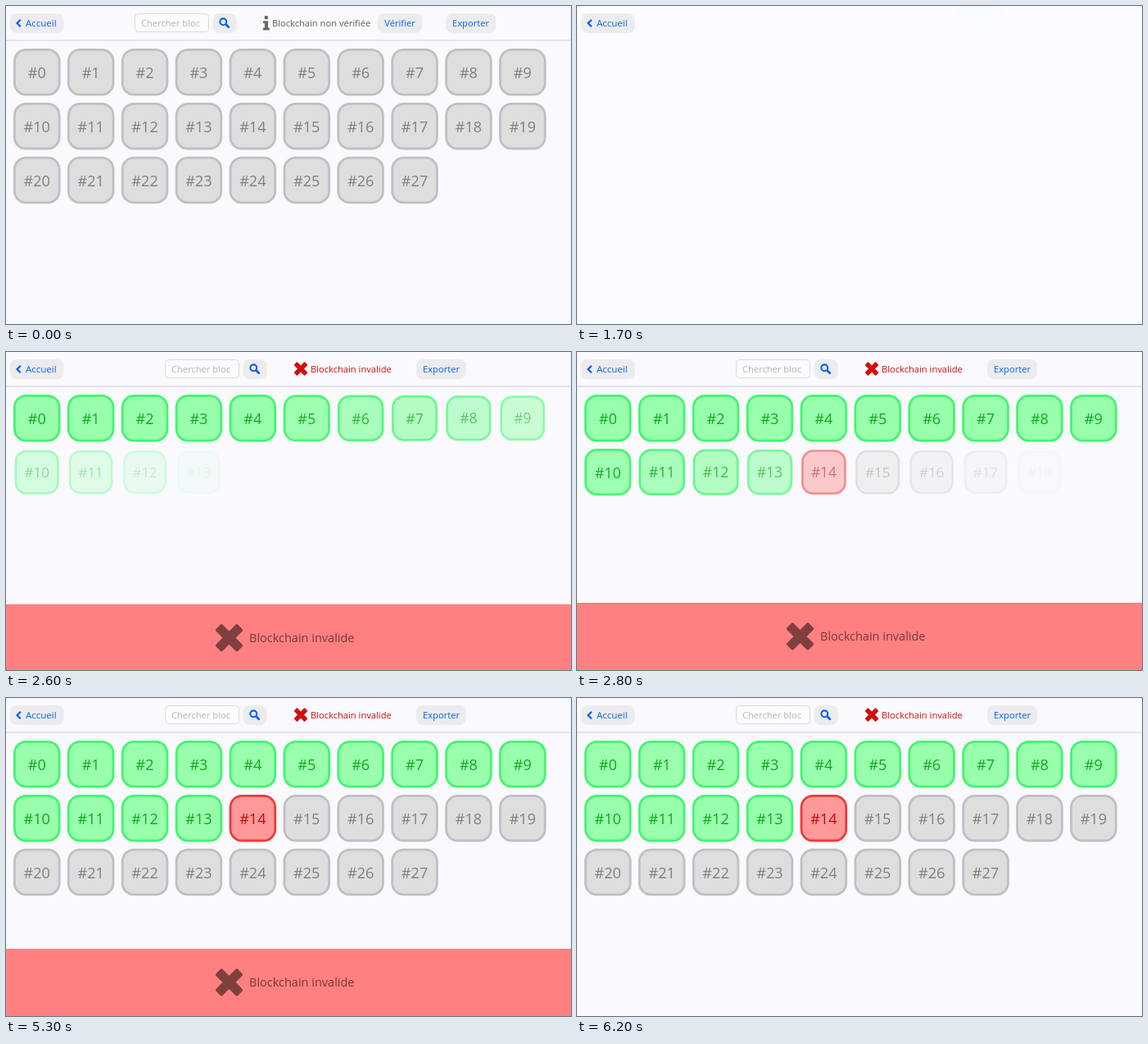
An HTML page with a canvas for the animation above (6900 ms loop, 690x388 px).

```html
<!DOCTYPE html>
<html lang="fr">
<head>
<meta charset="utf-8">
<title>Blockchain</title>
<style>
html, body { margin: 0; width: 100%; height: 100%; overflow: hidden; background: #fafcff; }
canvas { display: block; width: 690px; height: 388px; }
</style>
</head>
<body>
<canvas id="stage"></canvas>
<script>
const W = 690, H = 388, LOOP = 6900, STEP = 100;
const FONT = '"Open Sans", "Noto Sans", sans-serif';
const BLUE = '#0a62f0', BUTTON = '#ececee', PAGE = '#f9f9fe';
const COUNT = 28, BAD = 14, PITCH = 65.9, SIZE = 57.5;
const GREY = { fill: '#dedede', edge: '#c0c0c3', text: '#808080' };
const GREEN = { fill: '#99ffad', edge: '#42f56f', text: '#12a81c' };
const RED = { fill: '#ff9999', edge: '#f03a3a', text: '#c00c0c' };

const canvas = document.getElementById('stage');
const ctx = canvas.getContext('2d');
const dpr = window.devicePixelRatio || 1;
canvas.width = W * dpr;
canvas.height = H * dpr;

const clamp = v => Math.max(0, Math.min(1, v));
const span = (t, start, length) => clamp((t - start) / length);
const easeOut = p => 1 - (1 - p) ** 3;
const easeInOut = p => p < 0.5 ? 4 * p ** 3 : 1 - 4 * (1 - p) ** 3;
const mix = (a, b, p) => a.map((v, i) => Math.round(v + (b[i] - v) * p));
const rgb = c => `rgb(${c})`;

function box(x, y, w, h, r, fill, edge, line = 1) {
  ctx.beginPath();
  ctx.roundRect(x, y, w, h, r);
  ctx.fillStyle = fill;
  ctx.fill();
  if (edge) {
    ctx.strokeStyle = edge;
    ctx.lineWidth = line;
    ctx.stroke();
  }
}

function text(str, x, y, color, size = 11.15, align = 'left', weight = 400) {
  ctx.font = `${weight} ${size}px ${FONT}`;
  ctx.textAlign = align;
  ctx.textBaseline = 'alphabetic';
  ctx.fillStyle = color;
  ctx.fillText(str, x, y);
}

// Runs draw() faded and scaled about a point
function layer(alpha, scale, cx, cy, draw) {
  if (alpha <= 0) return;
  ctx.save();
  ctx.globalAlpha *= alpha;
  ctx.translate(cx, cy);
  ctx.scale(scale, scale);
  ctx.translate(-cx, -cy);
  draw();
  ctx.restore();
}

function button(label, x, w, fill = BUTTON, color = BLUE) {
  box(x, 9, w, 24, 8, fill);
  text(label, x + w / 2, 25, color, 11.2, 'center');
}

function cross(x, y, size, color) {
  const thick = size * 0.34, long = size * 1.13;
  ctx.save();
  ctx.translate(x, y);
  ctx.rotate(Math.PI / 4);
  ctx.fillStyle = color;
  ctx.beginPath();
  ctx.roundRect(-long / 2, -thick / 2, long, thick, size * 0.06);
  ctx.roundRect(-thick / 2, -long / 2, thick, long, size * 0.06);
  ctx.fill();
  ctx.restore();
}

function infoIcon(x, y) {
  ctx.fillStyle = '#666';
  ctx.beginPath();
  ctx.roundRect(x + 1.7, y, 4.2, 4.3, 1.2);
  ctx.roundRect(x, y + 6.2, 6, 2.8, 0.6);
  ctx.roundRect(x + 1.9, y + 6.2, 4.1, 10, 0.6);
  ctx.roundRect(x, y + 14.6, 7.8, 2.8, 0.6);
  ctx.fill();
}

function search(x) {
  box(x + 0.5, 9.5, 90, 22, 4, '#fcfcff', '#dadade');
  text('Chercher bloc', x + 8, 25, '#b4b4ba');
  box(x + 95.5, 9, 29, 24, 8, BUTTON);
  ctx.strokeStyle = BLUE;
  ctx.lineWidth = 2.1;
  ctx.beginPath();
  ctx.arc(x + 108.3, 19.3, 3.9, 0, Math.PI * 2);
  ctx.stroke();
  ctx.lineWidth = 2.7;
  ctx.lineCap = 'round';
  ctx.beginPath();
  ctx.moveTo(x + 111.8, 22.8);
  ctx.lineTo(x + 114.8, 25.8);
  ctx.stroke();
}

function backButton() {
  box(5, 9, 65.5, 24, 8, BUTTON);
  ctx.strokeStyle = BLUE;
  ctx.lineWidth = 2.3;
  ctx.lineCap = 'butt';
  ctx.beginPath();
  ctx.moveTo(17.8, 16.8);
  ctx.lineTo(13.6, 21);
  ctx.lineTo(17.8, 25.2);
  ctx.stroke();
  text('Accueil', 24, 25, BLUE, 11.5);
}

function backdrop() {
  ctx.fillStyle = PAGE;
  ctx.fillRect(-W, -H, 3 * W, 3 * H);
  ctx.fillStyle = '#d9d9de';
  ctx.fillRect(-W, 41.3, 3 * W, 1.3);
}

function tile(i, look) {
  const x = 9 + (i % 10) * PITCH, y = 52 + Math.floor(i / 10) * PITCH;
  box(x + 1.4, y + 1.4, SIZE - 2.8, SIZE - 2.8, 14, look.fill, look.edge, 2.8);
  text('#' + i, x + SIZE / 2, y + 35.7, look.text, 18.1, 'center', 500);
}

function uncheckedPage(t) {
  const press = span(t, 1050, 250);
  backdrop();
  search(157);
  infoIcon(314, 12);
  text('Blockchain non vérifiée', 325, 25, '#606060');
  button('Vérifier', 454, 54, rgb(mix([236, 236, 238], [10, 102, 255], press)),
    rgb(mix([10, 98, 240], [255, 255, 255], press)));
  button('Exporter', 537, 61);
  for (let i = 0; i < COUNT; i++) tile(i, GREY);
}

function checkedPage(t) {
  backdrop();
  search(194);
  cross(360, 20.5, 16.5, '#d20f0f');
  text('Blockchain invalide', 372, 25, '#d20f0f');
  button('Exporter', 501, 61);
  for (let i = 0; i < COUNT; i++) {
    const p = span(t, 2060 + i * 40, 360);
    const cx = 9 + (i % 10) * PITCH + SIZE / 2;
    const cy = 52 + Math.floor(i / 10) * PITCH + SIZE / 2;
    const look = i < BAD ? GREEN : i === BAD ? RED : GREY;
    layer(p, 0.91 + 0.09 * p, cx, cy, () => tile(i, look));
  }
}

function banner(t) {
  const shown = easeOut(span(t, 2150, 620)) - easeInOut(span(t, 5650, 530));
  if (shown <= 0) return;
  const y = H - 82 * shown;
  ctx.fillStyle = '#ff8080';
  ctx.fillRect(0, y, W, 83);
  cross(272.5, y + 41, 33.5, '#803f3f');
  text('Blockchain invalide', 297, y + 46, '#783838', 14.5);
}

function draw(t) {
  ctx.setTransform(dpr, 0, 0, dpr, 0, 0);
  ctx.globalAlpha = 1;
  ctx.fillStyle = '#fafcff';
  ctx.fillRect(0, 0, W, H);
  if (t < 1750) {
    const p = span(t, 1450, 252);
    layer(1 - p, 1 + 0.077 * p ** 3, W / 2, H / 2, () => uncheckedPage(t));
  } else {
    const p = easeOut(span(t, 1750, 400));
    layer(p, 0.93 + 0.07 * p, W / 2, H / 2, () => checkedPage(t));
    banner(t);
  }
  backButton();
}

const start = performance.now();
function tick() {
  const t = (performance.now() - start) % LOOP;
  draw(Math.floor(t / STEP) * STEP);
  requestAnimationFrame(tick);
}
tick();
</script>
</body>
</html>
```
